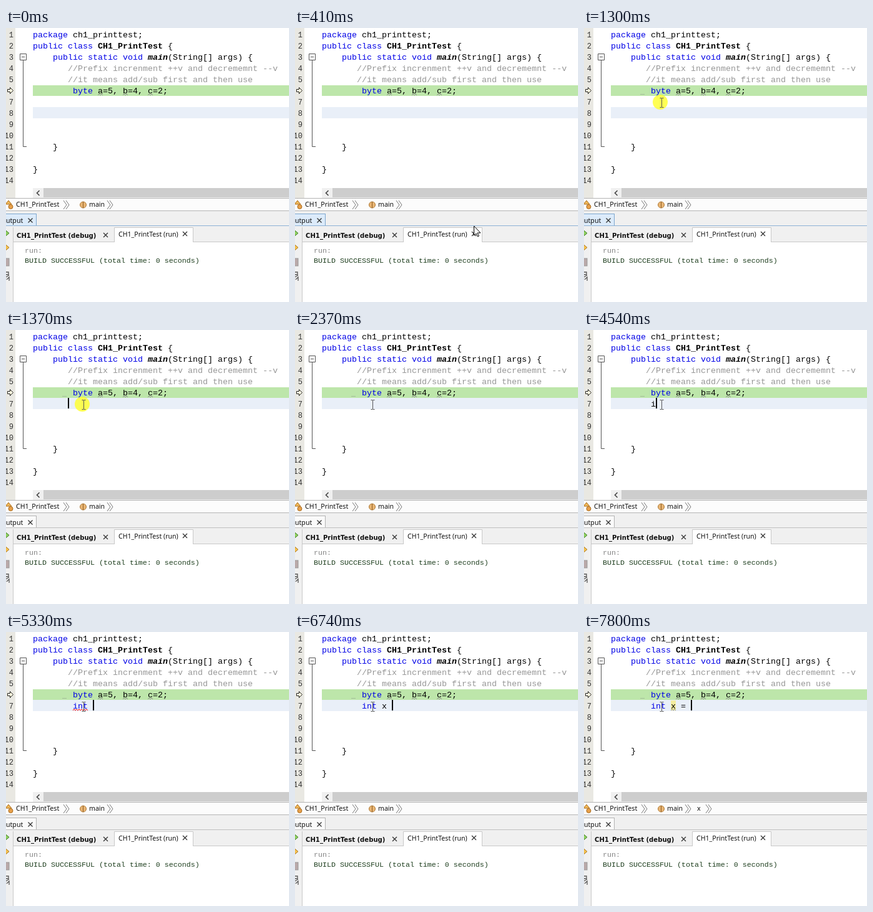
Animation, 453 px wide and 440 px high, one loop 8000 ms. Source, as an HTML page:

```html
<!DOCTYPE html>
<html lang="en">
<head>
<meta charset="utf-8">
<title>Code editor</title>
<style>
  html, body { margin: 0; width: 100%; height: 100%; overflow: hidden; background: #fff; }
  svg { display: block; width: 453px; height: 440px; }
  text { white-space: pre; }
  .code { font: 13.333px "Liberation Mono", "Courier New", monospace; }
  .num { font: 12px "Liberation Mono", monospace; fill: #333; text-anchor: end; }
  .log { font: 11.667px "Liberation Mono", monospace; }
  .ui { font: 10.6px "Noto Sans", Tahoma, sans-serif; fill: #111; }
  .bold { font: bold 10.1px "DejaVu Sans", Verdana, sans-serif; fill: #111; }
  .key { fill: #0000e6; }
  .note { fill: #969696; }
  b, .strong { font-weight: bold; }
  .slant { font-weight: bold; font-style: italic; }
  .line { fill: none; stroke: #555; }
  .wave { fill: none; stroke: #8c8c8c; }
</style>
</head>
<body>
<svg viewBox="0 0 453 440">
  <defs>
    <path id="chevron" d="M0 0l5 7-5 7M4 0l5 7-5 7" fill="none" stroke="#777"/>
    <path id="close" d="M0 0l7 7M7 0l-7 7" fill="none" stroke="#333" stroke-width="1.3"/>
    <path id="squiggle" d="M0 2l2-2 2 2 2-2 2 2"/>
  </defs>

  <!-- editor -->
  <rect width="453" height="440" fill="#fff"/>
  <rect width="15" height="273" fill="#e9e8e2"/>
  <rect id="active" x="43" y="127" width="410" height="18" fill="#e9eff8"/>
  <rect x="43" y="92" width="410" height="17" fill="#bde6aa"/>
  <g id="numbers"></g>
  <path d="M2.5 98.5h4v-3l5 5-5 5v-3h-4z" fill="#fffbe0" stroke="#222"/>
  <path class="line" d="M27.5 52V190.5H33"/>
  <path class="line" d="M22.5 41.5h10v10h-10zM25 46.5h5"/>

  <g class="code">
    <text x="43" y="15"><tspan class="key">package</tspan> ch1_printtest;</text>
    <text x="43" y="33"><tspan class="key">public class</tspan> <tspan class="strong">CH1_PrintTest</tspan> {</text>
    <text x="75" y="51"><tspan class="key">public static void</tspan> <tspan class="slant">main</tspan>(String[] args) {</text>
    <text x="99" y="69" class="note">//Prefix increnment ++v and decrememnt --v</text>
    <text x="99" y="87" class="note">//it means add/sub first and then use</text>
    <text x="107" y="105"><tspan class="key">byte</tspan> a=5, b=4, c=2;</text>
    <text x="75" y="195">}</text>
    <text x="43" y="231">}</text>
  </g>
  <g class="wave">
    <use href="#squiggle" x="147" y="106"/>
    <use href="#squiggle" x="187" y="106"/>
    <use href="#squiggle" x="227" y="106"/>
  </g>
  <path id="mark" d="M90 106.5h7" stroke="#a3bd9a"/>

  <!-- line being typed -->
  <rect id="unused" x="139" y="110" width="8" height="16" fill="#f4eda0"/>
  <text class="code" x="107" y="123"><tspan id="type"></tspan><tspan id="rest"></tspan></text>
  <g id="intError" fill="none" stroke="#f00">
    <use href="#squiggle" x="107" y="124"/>
    <use href="#squiggle" x="115" y="124"/>
    <use href="#squiggle" x="123" y="124"/>
  </g>
  <use id="xError" href="#squiggle" x="139" y="124" fill="none" stroke="#f00"/>
  <use id="xHint" class="wave" href="#squiggle" x="139" y="124"/>
  <rect id="caret" y="109" width="2" height="17"/>
  <g id="badge">
    <rect x="2" y="110" width="12" height="16" fill="#e9e8e2"/>
    <circle cx="8" cy="118" r="5" fill="#d9362b"/>
    <path d="M8 115v4M8 120v1.5" stroke="#fff" stroke-width="1.5"/>
  </g>

  <!-- scroll bar and breadcrumbs -->
  <rect x="43" y="257" width="410" height="16" fill="#f0f0f0"/>
  <rect id="thumb" x="60" y="257" width="393" height="15"/>
  <path d="M53.5 261l-4 4 4 4" fill="none" stroke="#444" stroke-width="1.6"/>
  <rect y="273" width="453" height="1" fill="#b4b4b4"/>
  <rect y="274" width="453" height="19" fill="#fcfcfc"/>
  <path d="M-1 283l5-6 5 6z" fill="#f0b95a" stroke="#a86a1c"/>
  <circle cx="7.5" cy="287" r="3.5" fill="#e8a04a" stroke="#a86a1c"/>
  <text class="ui" x="16" y="287">CH1_PrintTest</text>
  <use href="#chevron" x="92" y="277"/>
  <circle cx="123.500" cy="284" r="5" fill="#e8b574" stroke="#b07a35"/>
  <path d="M123.500 279v10" stroke="#8e5c20"/>
  <text class="ui" x="133" y="287">main</text>
  <use href="#chevron" x="162" y="277"/>
  <g id="crumb">
    <text class="ui" x="181" y="287">x</text>
    <use href="#chevron" x="195" y="277"/>
  </g>

  <!-- output window -->
  <rect y="293" width="453" height="50" fill="#f0f0f0"/>
  <rect y="293" width="453" height="1" fill="#b4b4b4"/>
  <rect id="tab" x="-1.500" y="298.500" width="50" height="19"/>
  <rect id="rule" y="317" width="453" height="1"/>
  <text class="ui" x="0" y="313">utput</text>
  <use href="#close" x="35.500" y="305.500"/>
  <rect y="318" width="11" height="122" fill="#f0f0f0"/>
  <path d="M11.500 320V440M11 343.500H173M299 343.500H453" stroke="#c8c8c8"/>
  <path d="M173.500 344V320.500H299.500V343" fill="#fff" stroke="#c8c8c8"/>
  <text class="bold" x="17" y="337">CH1_PrintTest (debug)</text>
  <use href="#close" x="156" y="329"/>
  <text class="ui" x="180" y="335">CH1_PrintTest (run)</text>
  <use href="#close" x="283" y="327"/>
  <path d="M-1 324.500l6 5-6 5z" fill="#8fd05f" stroke="#3f7c2a"/>
  <path d="M-1 347.500l6 5-6 5z" fill="#f5c04e" stroke="#a97a26"/>
  <rect x="-1" y="370" width="6" height="12" fill="#b9a9a9" stroke="#999"/>
  <path d="M0 392h4v4h-4M0 400l5-3M1 404l4-4v6" fill="none" stroke="#555" stroke-width="1.300"/>
  <text class="log" x="30" y="361" fill="#858585">run:</text>
  <text class="log" x="30" y="377" fill="#1f3f1f">BUILD SUCCESSFUL (total time: 0 seconds)</text>

  <!-- pointer -->
  <circle id="glow" cx="122" cy="119" r="12" fill="#ffff28" opacity=".8"/>
  <g id="mouse">
    <path id="beam" d="M-3 -7.500h2.500l.5 .5.5-.5h2.500M0 -7V7M-3 7.500h2.500l.5-.5.5 .5h2.500" fill="none" stroke="#555"/>
    <path id="arrow" d="M0 0v15l3.500-3 2.500 5 2-1-2.500-5h5z" fill="#fff" stroke="#000"/>
  </g>
</svg>
<script>
const LOOP = 8000, LINE = "int x = ";
const $ = id => document.getElementById(id);
const show = (id, on) => $(id).setAttribute("visibility", on ? "visible" : "hidden");
const set = (id, name, value) => $(id).setAttribute(name, value);
const within = (t, from, to) => t >= from && t < to;
const last = (list, t) => list.filter(item => item[0] <= t).pop();

for (let row = 1; row <= 14; row++) {
  if (row === 6) continue;
  const label = document.createElementNS("http://www.w3.org/2000/svg", "text");
  label.setAttribute("class", "num");
  label.setAttribute("x", 12);
  label.setAttribute("y", row * 18 - 3);
  label.textContent = row;
  $("numbers").append(label);
}

// [time, caret column]
const columns = [
  [0, 7], [3600, 8], [4500, 9], [4600, 10], [4700, 11], [4800, 12],
  [6640, 13], [6740, 14], [7540, 15], [7800, 16]
];
// [time, caret visible]
const blinks = [
  [0, 0], [1370, 1], [1700, 0], [2030, 1], [2370, 0], [2640, 1], [2970, 0], [3270, 1],
  [3870, 0], [4070, 1], [4400, 0], [4500, 1], [5130, 0], [5330, 1], [5660, 0], [5990, 1],
  [6270, 0], [6540, 1], [7070, 0], [7270, 1]
];

function drawLine(t) {
  const column = last(columns, t)[1];
  const typed = LINE.slice(0, Math.max(0, column - 8));
  $("type").textContent = typed.slice(0, 3);
  $("rest").textContent = typed.slice(3);
  set("type", "fill", typed.length < 3 ? "#000" : "#0000e6");
  set("caret", "x", 43 + column * 8);
  show("caret", last(blinks, t)[1]);
  show("intError", within(t, 5330, 6640));
  show("badge", within(t, 5460, 6640) || within(t, 7400, 7540));
  show("xError", within(t, 7400, 7670));
  show("xHint", t >= 7670);
  show("unused", t >= 7400);
  show("crumb", t >= 7400);
}

function drawPointer(t) {
  const step = Math.floor((t - 210) / 74) + 1;
  const p = Math.min(11, Math.max(0, step)) / 11;
  const ease = p * p * (3 - 2 * p);
  const x = Math.round(322 - 198 * ease) + .5;
  const y = Math.round(362 - 242 * ease);
  const overBar = y > 256 && y < 273;
  const overChrome = y > 256 && y < 343;
  set("mouse", "transform", `translate(${x} ${y})`);
  show("beam", t >= 70 && !overChrome);
  show("arrow", overChrome);
  set("thumb", "fill", overBar ? "#a6a6a6" : "#cdcdcd");
  show("mark", t >= 950);
  show("glow", within(t, 1300, 1430));
}

function draw(t) {
  const focused = t >= 1370;
  set("active", "y", focused ? 109 : 127);
  set("tab", "fill", focused ? "#fafafa" : "#dcebfa");
  set("tab", "stroke", focused ? "#b4b4b4" : "#7da7cf");
  set("rule", "fill", focused ? "#c0c0c0" : "#8db2d6");
  drawLine(t);
  drawPointer(t);
}

const start = performance.now();
function tick() {
  draw((performance.now() - start) % LOOP);
  requestAnimationFrame(tick);
}
tick();
</script>
</body>
</html>
```
